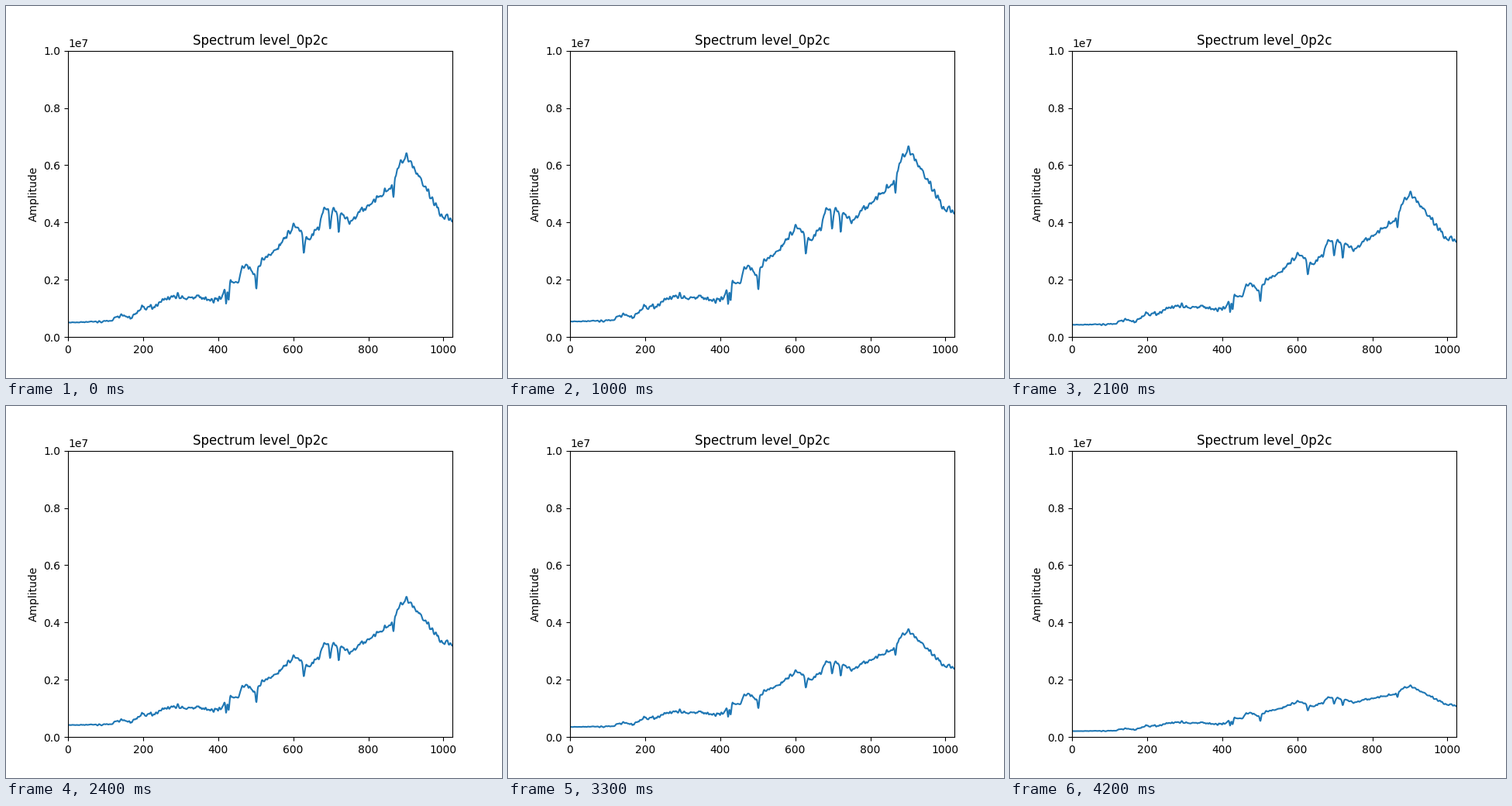
Recreate the animation shown at these times as a matplotlib script. Size 640 by 480 pixels, loop 4300 ms.

```python
import matplotlib.pyplot as plt
import numpy as np
from matplotlib.animation import FuncAnimation

plt.rcParams["text.kerning_factor"] = 6

FRAMES = 43
INTERVAL = 100
CHANNELS = np.arange(1024)
PEAK = 900  # loudest channel

# Broad shape of the first spectrum: channel, amplitude / 1e4
OUTLINE = [
    (0, 51), (115, 56), (142, 78), (170, 66), (197, 106), (220, 100),
    (275, 140), (410, 137), (418, 178), (433, 196), (455, 205), (464, 243),
    (480, 247), (497, 222), (528, 284), (560, 314), (600, 386), (614, 386),
    (628, 352), (645, 350), (668, 385), (676, 436), (687, 450), (728, 432),
    (753, 405), (786, 450), (856, 518), (874, 578), (886, 620), (901, 638),
    (960, 508), (992, 432), (1023, 410),
]
NOTCHES = [421, 428, 502, 628, 698, 721, 867]
NOTCH_DEPTH = 60

# Height of the peak over time: frame, amplitude / 1e6
PEAK_LEVEL = [(0, 6.42), (6, 7.06), (10, 6.66), (16, 5.45),
              (21, 5.08), (28, 4.65), (33, 3.77), (42, 1.81)]


def bell(x, width):
    return np.exp(-(x / width) ** 2 / 2)


def ripple():
    noise = np.random.default_rng(4).normal(size=CHANNELS.size)
    noise = np.convolve(noise, bell(np.arange(-5, 6), 1.5), mode="same")
    size = np.interp(CHANNELS, [0, 120, 220, 1023], [0.4, 2, 5, 6])
    return size * noise / noise.std()


def first_shape():
    y = np.interp(CHANNELS, *zip(*OUTLINE)) + ripple()
    for notch in NOTCHES:
        y -= NOTCH_DEPTH * bell(CHANNELS - notch, 1.9)
    return y / y[PEAK - 8:PEAK + 9].max()


SHAPE = first_shape()


def spectrum(frame):
    t = frame / (FRAMES - 1)
    u = CHANNELS / CHANNELS[-1]
    # The high channels fade faster, and the middle sags for a while
    fade = 0.43 * t ** 4 * u + 0.12 * np.sin(np.pi * t) * np.sin(np.pi * u)
    level = np.interp(frame, *zip(*PEAK_LEVEL)) * 1e6
    return level * SHAPE * np.exp(fade[PEAK] - fade)


fig, ax = plt.subplots(figsize=(6.4, 4.8), dpi=100)
ax.set_xlim(0, 1024)
ax.set_ylim(0, 1e7)
ax.set_title("Spectrum level_0p2c")
ax.set_ylabel("Amplitude")
line, = ax.plot(CHANNELS, spectrum(0))


def update(frame):
    line.set_ydata(spectrum(frame))
    return line,


anim = FuncAnimation(fig, update, frames=FRAMES, interval=INTERVAL,
                     repeat=True, repeat_delay=0)
plt.show()
```
